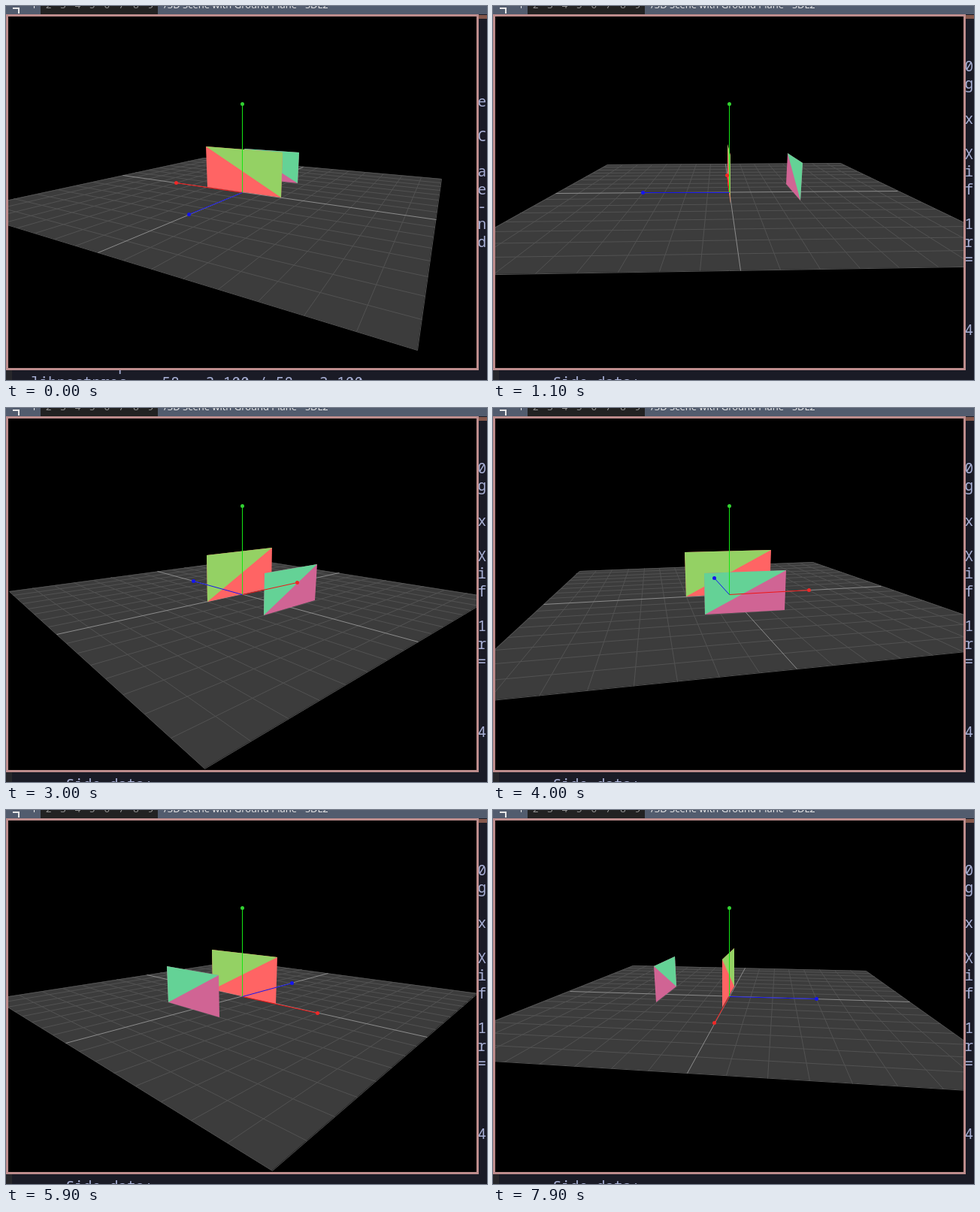
Recreate the animation shown at these times as an HTML page with a canvas. Size 640 px wide and 498 px high, loop 8 s.

```html
<!DOCTYPE html>
<html lang="en">
<head>
<meta charset="utf-8">
<title>3D Scene with Ground Plane</title>
<style>
html, body { margin: 0; width: 100%; height: 100%; overflow: hidden; background: #1a1b26; }
#stage { position: relative; width: 640px; height: 498px; overflow: hidden; background: #1a1b26; }
#stage > * { position: absolute; }
.term { font: 19.4px/23.4px "Noto Sans Mono", "DejaVu Sans Mono", monospace; color: #a9b1d6; white-space: pre; }
#bar { left: 0; top: 0; width: 640px; height: 11px; overflow: hidden; background: #525c6e;
  font: 13px/18px "Open Sans", "Noto Sans", sans-serif; color: #eee; }
#bar span { position: absolute; top: -11px; white-space: pre; }
#tags { position: absolute; left: 46px; top: 0; width: 156px; height: 11px; background: #222; }
#icon { position: absolute; left: 9px; top: 2px; width: 7px; height: 6px; border: solid #e8e8e8; border-width: 2px 2px 0 0; }
#edge { left: 629px; top: 12px; width: 11px; height: 5px; background: #85584c; }
#strip { left: 0; top: 485px; width: 8px; height: 13px; background: #27272b; }
#win { left: 0; top: 11px; width: 623px; height: 468px; border: 3px solid #bd8c8c; background: #000; overflow: hidden; }
canvas { display: block; margin: -1px; }
</style>
</head>
<body>
<div id="stage">
  <div id="strip"></div>
  <div id="edge"></div>
  <div id="text"></div>
  <div id="bar">
    <div id="icon"></div>
    <div id="tags"></div>
    <span style="left:210px">/3D Scene with Ground Plane - SDL2</span>
  </div>
  <div id="win"><canvas id="view" width="625" height="470"></canvas></div>
</div>
<script>
const LOOP = 8000;
// [start ms, heading in degrees]
const POSES = [
  [0, 210], [100, 239.2], [900, 268], [1900, 292.5], [2900, 318],
  [3900, 347.6], [4800, 375], [5800, 402.6], [6900, 431.7], [7500, 457.6]
];
const FOCAL = 468.75, DIST = Math.hypot(10, 2.5);
const SIN = 2.5 / DIST, COS = 10 / DIST;
const HALF = 5, CELL = 0.625, AXIS = 2.5;
const CX = 312.5, CY = 235;

// Terminal: left text by line counted up from the bottom, and the column at the right edge
const SCREENS = [
  { left: { 0: "libpostproc    58.  3.100 / 58.  3.100", 1: "libswresample   5.  3.100 /  5.  3.100" },
    right: { 16: "e", 14: "C", 12: "a", 11: "e", 10: "-", 9: "n", 8: "d" } },
  { left: { 0: "    Side data:" },
    right: { 18: "0", 17: "g", 15: "x", 13: "X", 12: "i", 11: "f", 9: "1", 8: "r", 7: "=", 3: "4" } }
];

const textBox = document.getElementById("text");
const ctx = document.getElementById("view").getContext("2d");

function addText(parent, str, x, line) {
  const el = document.createElement("div");
  el.className = "term";
  el.style.cssText = `position:absolute;left:${x}px;top:${489 - 23.4 * line}px`;
  el.textContent = str;
  parent.append(el);
}

const screens = SCREENS.map(({ left, right }) => {
  const box = document.createElement("div");
  for (const k in left) addText(box, left[k], 33, k);
  for (const k in right) addText(box, right[k], 627.5, k);
  textBox.append(box);
  return box;
});

const bar = document.getElementById("bar");
for (let n = 1; n <= 9; n++) {
  const tag = document.createElement("span");
  tag.textContent = n;
  tag.style.left = 33.5 + 19.4 * (n - 1) + "px";
  if (n > 1) tag.style.color = "#999";
  bar.append(tag);
}

let ca = 1, sa = 0;

// Screen points snap to whole pixels; strokes run through pixel centres
function project([x, y, z], shift = 0) {
  const side = x * ca + z * sa;
  const near = x * sa - z * ca;
  const k = FOCAL / (DIST - near * COS - y * SIN);
  return [CX + side * k, CY - (y * COS - near * SIN) * k].map(v => Math.floor(v) + shift);
}

function trace(points, shift) {
  ctx.beginPath();
  for (const p of points) ctx.lineTo(...project(p, shift));
}

function fill(points, color) {
  trace(points);
  ctx.fillStyle = color;
  ctx.fill();
}

function line(a, b, color) {
  trace([a, b], 0.5);
  ctx.strokeStyle = color;
  ctx.stroke();
}

function ground() {
  const h = HALF;
  fill([[-h, 0, -h], [h, 0, -h], [h, 0, h], [-h, 0, h]], "#3c3c3c");
  const pair = (p, color) => {
    line([p, 0, -h], [p, 0, h], color);
    line([-h, 0, p], [h, 0, p], color);
  };
  for (let p = -h; p <= h; p += CELL) if (p) pair(p, "#525252");
  pair(0, "#8c8c8c");
}

function panel(w, h, z, upper, lower) {
  const a = [-w, 0, z], b = [w, 0, z], c = [w, h, z], d = [-w, h, z];
  fill([a, b, c, d], lower);
  fill([a, c, d], upper);
}

function axis(tip, color, dot) {
  line([0, 0, 0], tip, color);
  ctx.beginPath();
  ctx.arc(...project(tip, 0.5), 2.5, 0, Math.PI * 2);
  ctx.fillStyle = dot;
  ctx.fill();
}

function draw(t) {
  const deg = POSES.filter(p => p[0] <= t).pop()[1];
  ca = Math.cos(deg * Math.PI / 180);
  sa = Math.sin(deg * Math.PI / 180);
  screens[0].style.display = t < 100 ? "" : "none";
  screens[1].style.display = t < 100 ? "none" : "";

  ctx.clearRect(0, 0, 625, 470);
  ctx.lineWidth = 1;
  ground();
  const panels = [
    () => panel(1.25, 1.25, 0, "#94d164", "#ff6464"),
    () => panel(1, 1, -1.875, "#64d296", "#d06494")
  ];
  if (ca < 0) panels.reverse();
  panels.forEach(p => p());
  axis([AXIS, 0, 0], "#f01414", "#f02828");
  axis([0, AXIS, 0], "#14e614", "#32d232");
  axis([0, 0, AXIS], "#1414f0", "#1414f0");
}

const start = performance.now();
function tick() {
  draw((performance.now() - start) % LOOP);
  requestAnimationFrame(tick);
}
tick();
</script>
</body>
</html>
```
